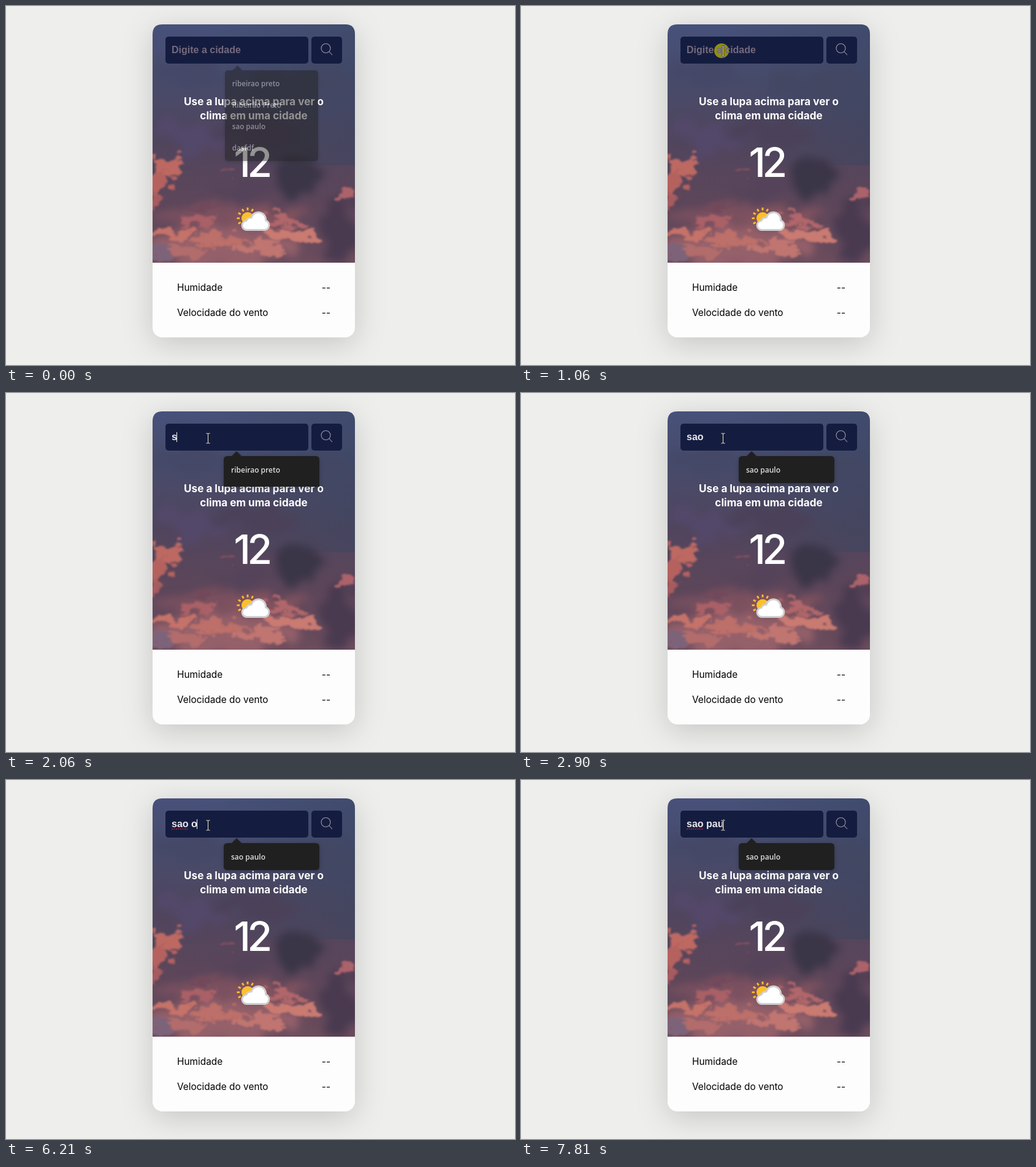
Write an HTML page that moves like this. It is 830x586 px and loops after 8000 ms.

```html
<!DOCTYPE html>
<html lang="pt-BR">
<head>
<meta charset="utf-8">
<title>Clima</title>
<style>
html, body { margin: 0; width: 100%; height: 100%; overflow: hidden; background: #eeeeec; }
svg { display: block; }
text { white-space: pre; font-family: Inter, Roboto, sans-serif; }
.head { font-size: 17.1px; font-weight: 700; fill: #fff; text-anchor: middle; }
.temp { font-size: 66px; font-weight: 500; fill: #fff; }
.row { font-size: 15.4px; fill: #000; }
.field { font: 700 16px "Liberation Sans", Arial, sans-serif; }
#popup text { font: 600 12px "Open Sans", "Noto Sans", sans-serif; fill: #dedede; }
#popup { filter: drop-shadow(0 2px 3px rgba(0,0,0,.25)); }
.card { filter: drop-shadow(0 10px 24px rgba(0,0,0,.17)); }
</style>
</head>
<body>
<svg width="830" height="586" viewBox="0 0 830 586">
  <defs>
    <linearGradient id="sky" x2="0" y2="1">
      <stop offset="0" stop-color="#47517a"/>
      <stop offset=".25" stop-color="#484b6a"/>
      <stop offset=".5" stop-color="#51455d"/>
      <stop offset=".75" stop-color="#5d465a"/>
      <stop offset="1" stop-color="#6c4d5d"/>
    </linearGradient>
    <linearGradient id="shade">
      <stop offset=".3" stop-color="#384560" stop-opacity="0"/>
      <stop offset="1" stop-color="#384560" stop-opacity=".5"/>
    </linearGradient>
    <filter id="soft" x="-20%" y="-20%" width="140%" height="140%" color-interpolation-filters="sRGB">
      <feTurbulence type="fractalNoise" baseFrequency=".025" numOctaves="4" seed="4"/>
      <feDisplacementMap in="SourceGraphic" scale="60" xChannelSelector="R" yChannelSelector="G"/>
      <feGaussianBlur stdDeviation="7"/>
    </filter>
    <filter id="ragged" x="-20%" y="-20%" width="140%" height="140%" color-interpolation-filters="sRGB">
      <feTurbulence type="fractalNoise" baseFrequency=".03 .05" numOctaves="5" seed="9"/>
      <feDisplacementMap in="SourceGraphic" scale="48" xChannelSelector="R" yChannelSelector="G"/>
      <feGaussianBlur stdDeviation="1.6"/>
    </filter>
    <clipPath id="photo"><path d="M239 419V46q0-16 16-16h298q16 0 16 16v373z"/></clipPath>
  </defs>

  <rect class="card" x="239" y="30" width="330" height="511" rx="16" fill="#fdfdfd"/>
  <g clip-path="url(#photo)">
    <rect x="239" y="30" width="330" height="389" fill="url(#sky)"/>
    <rect x="239" y="30" width="330" height="230" fill="url(#shade)"/>
    <g id="dusk" filter="url(#soft)"></g>
    <g id="glow" filter="url(#ragged)"></g>
  </g>

  <g fill="#141d40">
    <rect x="260" y="50" width="233" height="44" rx="5"/>
    <rect x="498" y="50" width="50" height="44" rx="5"/>
  </g>
  <path d="M527 74.500l5 5.500M529 69a7.500 7.500 0 1 1-15 0a7.500 7.500 0 1 1 15 0" fill="none" stroke="#9c9aa5" stroke-width="1.100"/>

  <text class="head" x="404" y="162">Use a lupa acima para ver o</text>
  <text class="head" x="404" y="185">clima em uma cidade</text>
  <text class="temp" x="371.500 393.500" y="279">12</text>

  <g id="rays" stroke="#fbc02a" stroke-width="2.800"></g>
  <circle cx="394" cy="346.500" r="10" fill="#fbc02a"/>
  <path d="M393 365.500a7.500 7.500 0 0 1-1-15a8 8 0 0 1 8-5a12 12 0 0 1 23.500 4.500a8 8 0 0 1-1.500 15.500z" fill="#fff" stroke="#cfd0d3" stroke-width="3" stroke-linejoin="round"/>

  <g class="row">
    <text x="279" y="465">Humidade</text><text x="529" y="465" text-anchor="end">--</text>
    <text x="279" y="506">Velocidade do vento</text><text x="529" y="506" text-anchor="end">--</text>
  </g>

  <circle id="click" cx="327" cy="73" r="12" fill="#c9c400" fill-opacity=".68"/>
  <text id="hint" class="field" x="270" y="77" fill="#75697c">Digite a cidade</text>
  <text id="typed" class="field" x="270" y="77" fill="#e9e8ec"></text>
  <path id="spell" d="M270 80h27" stroke="#c2263c" stroke-width="1.500" stroke-dasharray="2 1.500"/>
  <rect id="caret" y="64" width="1" height="16" fill="#fff"/>
  <g id="popup"><path fill="#202020"/><g></g></g>
  <g id="beam" fill="none">
    <path d="M-3-8h2.500l.5.500l.5-.5h2.500M0-8V8M-3 8h2.500l.5-.5l.5.500h2.500" stroke="#222" stroke-width="2.400"/>
    <path d="M-3-8h2.500l.5.500l.5-.5h2.500M0-8V8M-3 8h2.500l.5-.5l.5.500h2.500" stroke="#e6e6e6"/>
  </g>
  <path id="arrow" d="M0 0v16l3.700-3.500 2.600 6 2.400-1-2.500-5.900h5z" fill="#fff" stroke="#000"/>
</svg>

<script>
const $ = id => document.getElementById(id);
const show = (el, on) => el.setAttribute('visibility', on ? 'visible' : 'hidden');

// Clouds: centre x, centre y, radius x, radius y, colour
const blob = ([x, y, rx, ry, c]) => `<ellipse cx="${x}" cy="${y}" rx="${rx}" ry="${ry}" fill="${c}"/>`;
$('dusk').innerHTML = [
  [300, 110, 60, 18, '#454867'], [480, 130, 80, 22, '#434762'],
  [310, 215, 60, 24, '#54486a'], [410, 205, 70, 20, '#4b4159'],
  [480, 280, 36, 28, '#3a3547'], [400, 300, 50, 16, '#54435a'],
  [330, 345, 80, 20, '#7a505f'], [425, 345, 55, 18, '#83535f'],
  [350, 392, 130, 30, '#94606a'], [540, 360, 32, 50, '#493a50']
].map(blob).join('');
$('glow').innerHTML = [
  [262, 262, 24, 16, '#bd6962'], [250, 290, 16, 24, '#b5625f'], [247, 322, 12, 14, '#a65b5f'],
  [554, 304, 14, 12, '#ac626a'], [370, 272, 12, 5, '#89505f'], [318, 352, 34, 8, '#a96066'],
  [270, 370, 40, 9, '#c57269'], [445, 352, 44, 9, '#b0666a'], [468, 374, 42, 12, '#c97a71'],
  [345, 383, 46, 9, '#bd6f69'], [410, 396, 46, 8, '#c07570'], [288, 400, 44, 7, '#b16c6b'],
  [254, 405, 20, 9, '#7d6379'], [320, 328, 26, 6, '#71495a']
].map(blob).join('');

$('rays').innerHTML = [0, 1, 2, 3, 4, 5].map(i =>
  `<path d="M13 0h4.500" transform="translate(394 346.500) rotate(${150 + 30 * i})"/>`).join('');

const cities = ['ribeirao preto', 'Ribeirão Preto', 'sao paulo', 'dasfdf'];
const match = ['sao paulo'];

// Each step changes only the listed properties
const steps = [
  [0, { text: '', caret: 0, list: cities, height: 152, alpha: .48, spell: 0, click: 0 }],
  [70, { alpha: 0 }],
  [1060, { click: 1 }],
  [1130, { click: 0, caret: 1, alpha: 1 }],
  [1590, { caret: 0 }],
  [2060, { text: 's', caret: 1, list: ['ribeirao preto'], height: 50 }],
  [2130, { list: match, height: 44 }],
  [2200, { text: 'sa' }],
  [2340, { text: 'sao' }],
  [2900, { caret: 0 }],
  [2970, { text: 'sao ', caret: 1 }],
  [3030, { spell: 1 }],
  [3490, { caret: 0 }],
  [4030, { caret: 1 }],
  [4550, { caret: 0 }],
  [5080, { caret: 1 }],
  [5610, { caret: 0 }],
  [6140, { caret: 1 }],
  [6210, { text: 'sao o' }],
  [6280, { alpha: .7 }],
  [6350, { alpha: .3 }],
  [6420, { alpha: 0 }],
  [6750, { caret: 0 }],
  [6820, { text: 'sao ', caret: 1, alpha: 1 }],
  [7280, { caret: 0 }],
  [7410, { text: 'sao p', caret: 1 }],
  [7610, { text: 'sao pa' }],
  [7810, { text: 'sao pau' }]
];

const pen = document.createElement('canvas').getContext('2d');
pen.font = '700 16px "Liberation Sans", Arial, sans-serif';

function drawPopup({ list, height, alpha }) {
  const [shape, items] = $('popup').children;
  const r = height === 50 ? 0 : 6;
  shape.setAttribute('d', `M361 103h7l8-8 8 8h121q6 0 6 6v${height - 6 - r}q0 ${r} ${-r} ${r}` +
    `h${2 * r - 156}q${-r} 0 ${-r} ${-r}v${r + 6 - height}q0-6 6-6z`);
  items.innerHTML = list.map((s, i) => `<text x="367" y="${130 + 36 * i}">${s}</text>`).join('');
  const cy = 103 + height / 2, scale = alpha < 1 ? .974 : 1;
  $('popup').setAttribute('transform', `translate(433 ${cy}) scale(${scale}) translate(-433 ${-cy})`);
  $('popup').setAttribute('opacity', alpha);
}

function drawPointer(t) {
  const p = Math.min(1, Math.floor((t - 70) / 73) / 10);
  const e = p * p * (3 - 2 * p);
  const x = 680 - 350.5 * e, y = 450 - 376 * e;
  const inField = x > 260 && x < 493 && y > 50 && y < 94;
  show($('beam'), t >= 70 && inField);
  show($('arrow'), t >= 70 && !inField);
  for (const id of ['beam', 'arrow']) $(id).setAttribute('transform', `translate(${x} ${y})`);
}

let last = '';
function frame(now) {
  const t = now % 8000;
  const s = Object.assign({}, ...steps.filter(k => k[0] <= t).map(k => k[1]));
  const key = JSON.stringify(s);
  if (key !== last) {
    last = key;
    $('typed').textContent = s.text;
    $('caret').setAttribute('x', Math.round(269.6 + pen.measureText(s.text).width));
    show($('hint'), !s.text);
    show($('caret'), s.caret);
    show($('spell'), s.spell);
    show($('click'), s.click);
    drawPopup(s);
  }
  drawPointer(t);
}

const start = performance.now();
function tick() {
  frame(performance.now() - start);
  requestAnimationFrame(tick);
}
tick();
</script>
</body>
</html>
```
